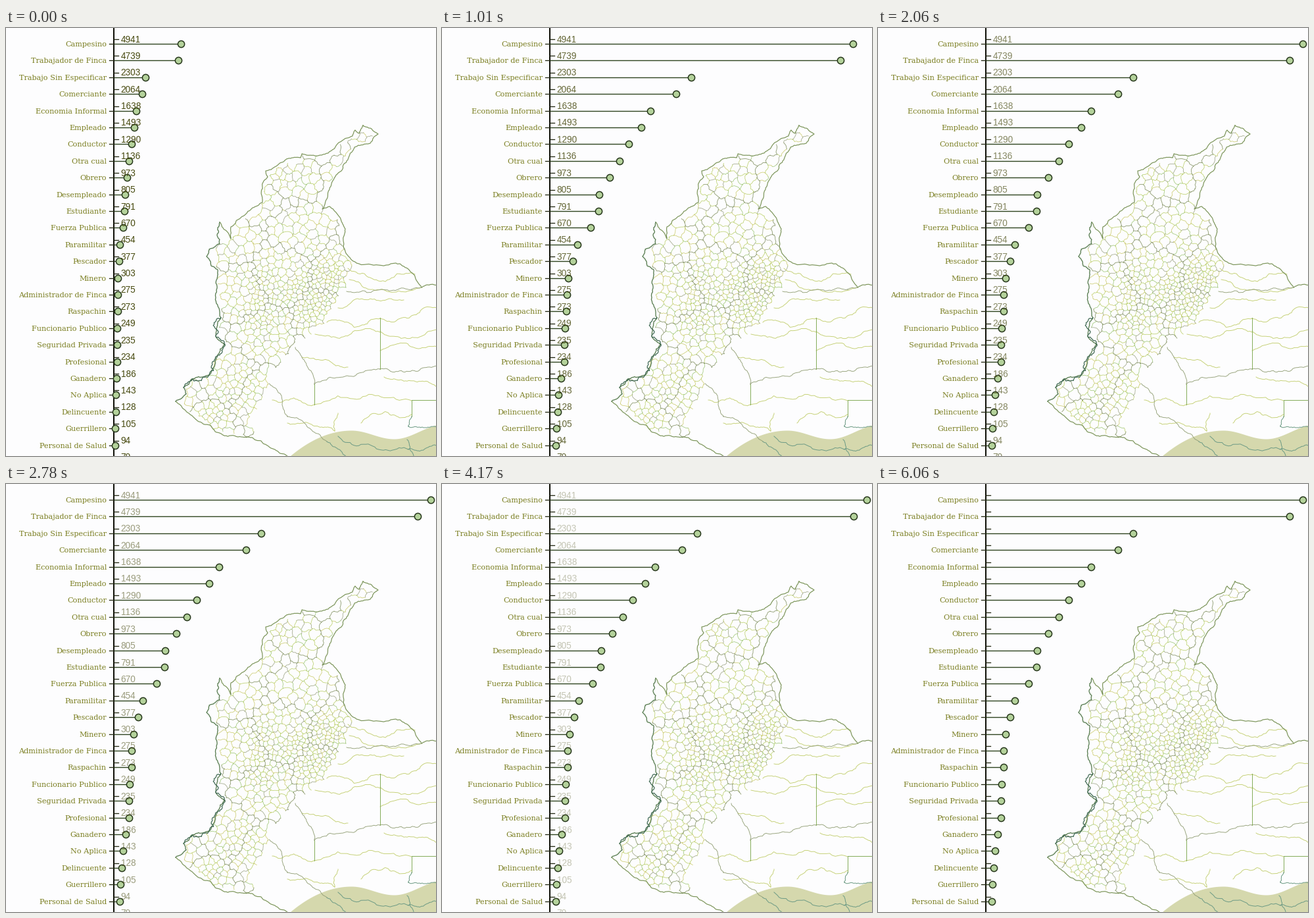
Write a matplotlib script that moves like this. It is 654x650 px and loops after 6.1 s.

```python
import numpy as np
import matplotlib.pyplot as plt
from matplotlib.animation import FuncAnimation
from matplotlib.path import Path
from matplotlib.tri import Triangulation

W, H, DPI = 654, 650, 100
LOOP, STEP = 6100, 50
PX = 72 / DPI
AXIS_X, TOP, ROW = 164, 24, 25.4
SCALE = 481.5 / 4941

JOBS = {
    "Campesino": 4941, "Trabajador de Finca": 4739,
    "Trabajo Sin Especificar": 2303, "Comerciante": 2064,
    "Economia Informal": 1638, "Empleado": 1493, "Conductor": 1290,
    "Otra cual": 1136, "Obrero": 973, "Desempleado": 805, "Estudiante": 791,
    "Fuerza Publica": 670, "Paramilitar": 454, "Pescador": 377,
    "Minero": 303, "Administrador de Finca": 275, "Raspachin": 273,
    "Funcionario Publico": 249, "Seguridad Privada": 235,
    "Profesional": 234, "Ganadero": 186, "No Aplica": 143,
    "Delincuente": 128, "Guerrillero": 105, "Personal de Salud": 94, "": 79,
}

PACIFIC = [
    (258, 567), (274, 556), (270, 546), (283, 533), (309, 527), (322, 497),
    (333, 481), (319, 468), (327, 440), (321, 395), (322, 367), (312, 361),
    (305, 347), (309, 336), (325, 328), (322, 303), (325, 295),
]
CARIBBEAN = [
    (325, 295), (342, 320), (342, 302), (362, 285), (390, 265), (390, 236),
    (398, 226), (395, 217), (424, 201), (448, 197), (450, 191), (490, 190),
    (527, 164), (531, 155), (537, 160), (543, 148),
]
EAST = [
    (543, 148), (556, 153), (566, 161), (554, 175), (530, 181), (520, 200),
    (497, 232), (481, 275), (492, 271), (509, 290), (516, 305), (517, 342),
    (533, 357), (593, 357), (605, 362), (632, 394), (656, 391),
]
SOUTH = [
    (258, 567), (280, 587), (310, 603), (318, 613), (358, 621), (388, 627),
    (410, 641), (440, 653),
]
FOOTHILLS = [
    (520, 390), (488, 446), (436, 490), (408, 520), (396, 560), (374, 604),
]
# Each row joins two ends: x0, y0, x1, y1.
PLAINS = [
    (520, 365, 622, 374), (522, 382, 632, 394), (505, 425, 605, 413),
    (488, 447, 569, 441), (569, 441, 655, 425), (470, 465, 569, 462),
    (569, 460, 655, 458), (569, 490, 655, 484), (450, 500, 520, 515),
    (575, 530, 655, 545), (469, 572, 617, 566), (405, 565, 469, 572),
    (505, 585, 500, 612), (540, 600, 617, 587), (428, 600, 500, 612),
]
BORDERS = [
    (518, 400, 617, 397), (617, 397, 632, 394), (440, 485, 469, 541),
    (469, 541, 569, 518), (569, 518, 655, 513), (400, 540, 428, 590),
    (428, 590, 488, 628),
]
STRAIGHT = [
    (569, 440, 569, 518), (469, 541, 469, 572), (655, 565, 617, 565),
    (617, 565, 617, 590),
]
RIVERS = [
    (488, 628, 522, 653), (505, 620, 612, 640), (612, 640, 655, 634),
    (617, 590, 612, 605), (612, 605, 655, 606), (610, 625, 620, 652),
]
# Centre, spread and strength of the densely divided areas.
CLUSTERS = [
    (492, 378, 32, 6.5), (458, 418, 27, 6), (390, 385, 27, 5.5),
    (385, 445, 23, 5.5), (322, 585, 22, 6), (413, 218, 16, 5),
    (365, 535, 26, 4),
]

rng = np.random.default_rng(7)


def rough(pts, amp=0.14, depth=2):
    """Subdivide a polyline, pushing each midpoint sideways."""
    p = np.array(pts, float)
    for _ in range(depth):
        d = np.diff(p, axis=0)
        side = np.column_stack([-d[:, 1], d[:, 0]])
        mid = (p[:-1] + p[1:]) / 2 + amp * rng.uniform(-1, 1, (len(d), 1)) * side
        out = np.empty((len(p) + len(mid), 2))
        out[::2], out[1::2] = p, mid
        p = out
    return p


def joins(rows, amp=0.15):
    return [rough(np.reshape(r, (2, 2)), amp, 5) for r in rows]


def spacing(x, y):
    dense = sum(k * np.exp(-((x - cx) ** 2 + (y - cy) ** 2) / (2 * s * s))
                for cx, cy, s, k in CLUSTERS)
    return max(4.6, 11 - dense)


def scatter(tries, gap_at):
    """Random sites that keep a local minimum distance."""
    sites = np.empty((tries, 2))
    n = 0
    for x, y in rng.uniform((245, 135), (580, 645), (tries, 2)):
        gap = np.hypot(sites[:n, 0] - x, sites[:n, 1] - y)
        if n == 0 or gap.min() > gap_at(x, y):
            sites[n] = x, y
            n += 1
    return sites[:n]


def cell_edges(sites, region):
    """Voronoi edges inside the region: those within and between provinces."""
    tri = Triangulation(*sites.T)
    a, b, c = (sites[tri.triangles[:, k]] for k in range(3))
    u, v = b - a, c - a
    det = 2 * (u[:, 0] * v[:, 1] - u[:, 1] * v[:, 0])
    uu, vv = (u ** 2).sum(1), (v ** 2).sum(1)
    centre = a + np.column_stack([
        (v[:, 1] * uu - u[:, 1] * vv) / det,
        (u[:, 0] * vv - v[:, 0] * uu) / det,
    ])
    inside = region.contains_points(centre)
    capitals = scatter(400, lambda x, y: 62)
    province = np.argmin(
        ((sites[:, None] - capitals[None]) ** 2).sum(2), axis=1)
    within, between = [], []
    for i, near in enumerate(tri.neighbors):
        for k, j in enumerate(near):
            if j > i and inside[i] and inside[j]:
                p, q = tri.triangles[i, [k, (k + 1) % 3]]
                group = within if province[p] == province[q] else between
                group.append(rough(centre[[i, j]], 0.22))
    return within, between


def wave(x):
    rise = 611 + 39 * (np.minimum(x - 525, 0) / 93) ** 2
    swell = 6.5 * (1 - np.cos(np.maximum(x - 525, 0) * np.pi / 65))
    return rise + swell - 8 * (np.maximum(x - 590, 0) / 64) ** 2


fig = plt.figure(figsize=(W / DPI, H / DPI), dpi=DPI, facecolor="#fdfdfe")
ax = fig.add_axes([0, 0, 1, 1])
ax.set(xlim=(0, W), ylim=(H, 0))
ax.axis("off")


def stroke(lines, color, width, z=1):
    """Draw many polylines as one artist."""
    gap = [[np.nan, np.nan]]
    xy = np.vstack([np.vstack([line, gap]) for line in lines])
    ax.plot(*xy.T, color=color, lw=width * PX, zorder=z, solid_joinstyle="round")


def draw_map():
    x = np.arange(430, W + 3)
    ax.fill_between(x, wave(x), H + 2, color="#d5d8ad", lw=0, zorder=0)
    region = Path(PACIFIC + CARIBBEAN + EAST[:13] + FOOTHILLS + SOUTH[5::-1])
    within, between = cell_edges(scatter(16000, spacing), region)
    pick = rng.choice(4, len(within), p=[0.4, 0.25, 0.2, 0.15])
    for k, color in enumerate(["#bfd373", "#cfcf78", "#a5cb80", "#a3aa8d"]):
        stroke([e for e, p in zip(within, pick) if p == k], color, 0.8)
    stroke(between, "#93a077", 0.9, 2)
    stroke(joins(PLAINS), "#c3cf70", 0.9)
    stroke(joins(BORDERS), "#93a077", 0.9, 2)
    stroke(joins(STRAIGHT, 0), "#86ad5c", 1, 2)
    stroke(joins(RIVERS), "#6f9c86", 1, 2)
    stroke([rough(p, 0.11, 4) for p in (CARIBBEAN, EAST, SOUTH)],
           "#7c955a", 1.2, 3)
    stroke([rough(PACIFIC, 0.15, 4)], "#587c50", 1.3, 3)
    stroke([rough(PACIFIC[2:9], 0.3, 4)], "#3c6650", 1.2, 3)


draw_map()

values = np.array(list(JOBS.values()))
rows = TOP + ROW * np.arange(len(JOBS))
ink = "#20260f"
ax.plot([AXIS_X] * 2, [-2, H + 2], color="#0c0d05", lw=2 * PX, zorder=5)
stroke([[(156.5, y), (AXIS_X, y)] for y in rows], ink, 1.3, 5)
stroke([[(AXIS_X, y - 7), (171, y - 7)] for y in rows], ink, 1.3, 5)

numbers = []
for (name, value), y in zip(JOBS.items(), rows):
    ax.text(153, y + 4, name, ha="right", va="baseline", color="#7b7f22",
            family="DejaVu Serif", size=11.25 * PX, zorder=6)
    numbers.append(ax.text(174.5, y - 2.5, str(value), va="baseline",
                           color="#45480d", family="Liberation Sans",
                           size=13.6 * PX, zorder=9, clip_on=True))

bars = ax.hlines(rows, AXIS_X, AXIS_X, color="#2f4420", lw=1.4 * PX, zorder=6)
dots, = ax.plot(values * 0, rows, "o", ms=10.2 * PX, mfc="#b4d29b",
                mec="#25351a", mew=1.5 * PX, zorder=7)


def grow(t):
    """Quadratic ease-out, already under way when the loop starts."""
    u = 0.1123 + (t / 1502 if t >= 130 else 0)
    return 1 - (1 - min(u, 1)) ** 2


def update(i):
    t = i * STEP + 20
    x = AXIS_X + values * SCALE * grow(t)
    bars.set_segments([[(AXIS_X, y), (end, y)] for end, y in zip(x, rows)])
    dots.set_xdata(x)
    for label in numbers:
        label.set_alpha(max(0, 1 - t / 6050))
    return [bars, dots, *numbers]


anim = FuncAnimation(fig, update, frames=LOOP // STEP, interval=STEP,
                     repeat=True, repeat_delay=0, blit=False)
plt.show()
```
